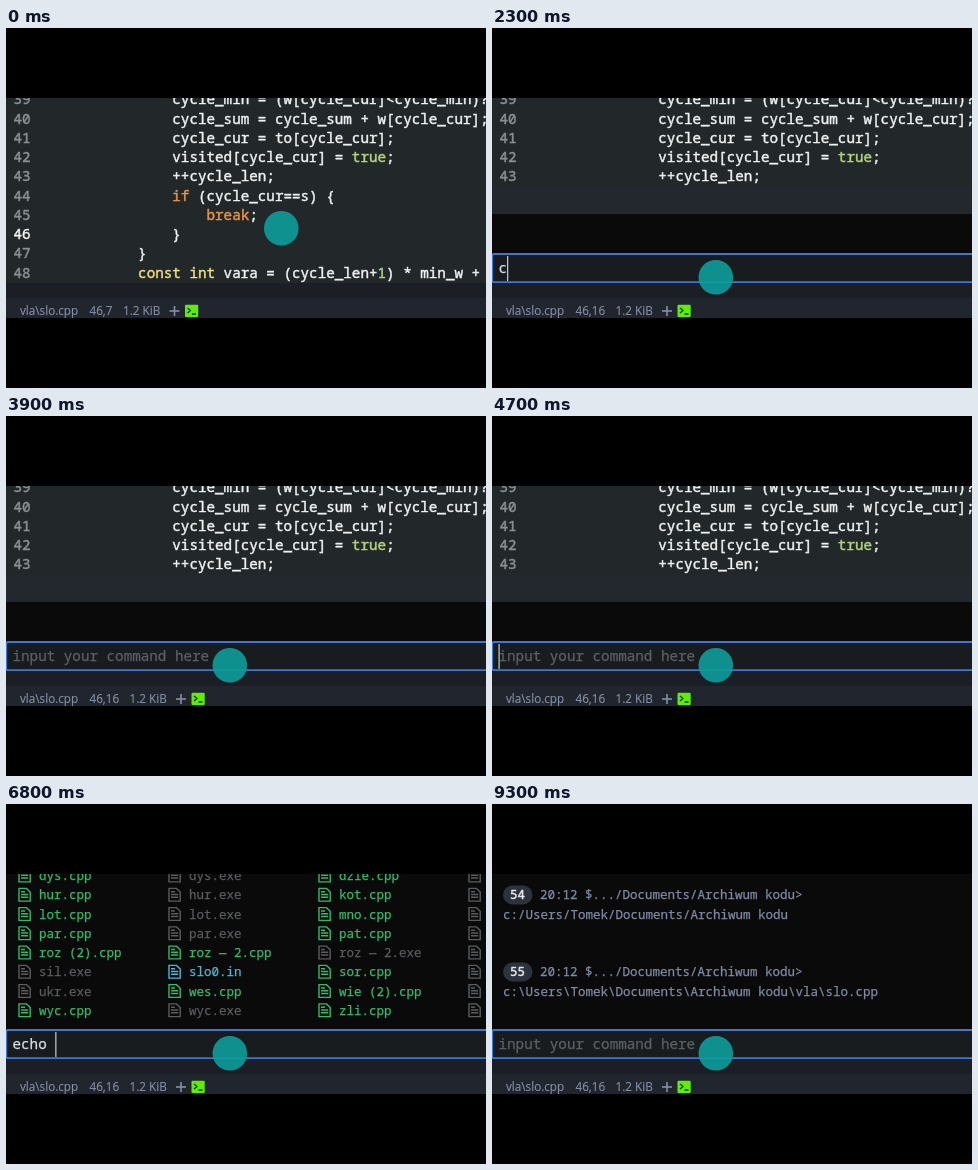
An HTML page with a canvas that plays this animation: 480 px wide and 360 px high, repeating every 9.4 s.

```html
<!DOCTYPE html>
<html>
<head>
<meta charset="utf-8">
<style>
html, body { margin: 0; width: 100%; height: 100%; overflow: hidden; background: #000; }
canvas { display: block; }
</style>
</head>
<body>
<canvas id="stage" width="480" height="360"></canvas>
<script>
const ctx = document.getElementById('stage').getContext('2d');
const LOOP = 9400, ROW = 19.25, CHAR = 8.55;
const MONO = '"Noto Sans Mono", "DejaVu Sans Mono", monospace';
const CODE_FONT = `14.25px ${MONO}`, OUT_FONT = `12.5px ${MONO}`;
const BAR_FONT = '11.7px "Open Sans", "Noto Sans", sans-serif';
const GREEN = '#2dbd6b', GRAY = '#5a5c5e', CYAN = '#4ab8d6';

// Each entry: indent in characters, code
const code = [
  [16, 'cycle_min = (w[cycle_cur]<cycle_min)?'],
  [16, 'cycle_sum = cycle_sum + w[cycle_cur];'],
  [16, 'cycle_cur = to[cycle_cur];'],
  [16, 'visited[cycle_cur] = true;'],
  [16, '++cycle_len;'],
  [16, 'if (cycle_cur==s) {'],
  [20, 'break;'],
  [16, '}'],
  [12, '}'],
  [12, 'const int vara = (cycle_len+1) * min_w +']
];
const tokenColor = {
  const: '#f0e07c', int: '#f0e07c', true: '#b5d47e', 1: '#b5d47e', if: '#e8934a', break: '#e8934a'
};

const files = [
  ['dys.cpp', 'dys.exe', 'dzie.cpp', 'dzie.exe'],
  ['hur.cpp', 'hur.exe', 'kot.cpp', 'kot.exe'],
  ['lot.cpp', 'lot.exe', 'mno.cpp', 'mno.exe'],
  ['par.cpp', 'par.exe', 'pat.cpp', 'pat.exe'],
  ['roz (2).cpp', 'roz — 2.cpp', 'roz — 2.exe', 'roz.exe'],
  ['sil.exe', 'slo0.in', 'sor.cpp', 'sor.exe'],
  ['ukr.exe', 'wes.cpp', 'wie (2).cpp', 'wie.exe'],
  ['wyc.cpp', 'wyc.exe', 'zli.cpp', 'zli.exe']
];

// Typed commands: text, start, time per key, end
const typing = [
  ['cls', 2300, 200, 3000],
  ['ls', 5000, 200, 5500],
  ['echo %(cwd)', 6200, 130, 7600],
  ['echo %(file)', 8150, 65, 8950]
];
// Commands that run: number, start, end, output
const runs = [
  [53, 3000, 3500, ''],
  [54, 7600, 7800, 'c:/Users/Tomek/Documents/Archiwum kodu'],
  [55, 8950, 9100, 'c:\\Users\\Tomek\\Documents\\Archiwum kodu\\vla\\slo.cpp']
];

function rect(x, y, w, h, color) {
  ctx.fillStyle = color;
  ctx.fillRect(x, y, w, h);
}

// A thin outline thickens the strokes slightly
function text(str, x, y, color, font, weight = 0.25) {
  ctx.font = font;
  ctx.fillStyle = ctx.strokeStyle = color;
  ctx.lineWidth = weight;
  ctx.lineJoin = 'round';
  ctx.fillText(str, x, y);
  ctx.strokeText(str, x, y);
}

function drawEditor(bottom) {
  rect(0, 70, 480, bottom - 70, '#22282a');
  ctx.save();
  ctx.beginPath();
  ctx.rect(0, 70, 480, bottom - 70);
  ctx.clip();
  code.forEach(([indent, line], i) => {
    const y = 76.4 + i * ROW, number = 39 + i;
    text(number, 7.5, y, number === 46 ? '#f4f4f4' : '#8b9193', CODE_FONT, 0.45);
    let x = 29.5 + indent * CHAR;
    for (const part of line.split(/\b(const|int|true|if|break|1)\b/)) {
      text(part, x, y, tokenColor[part] || '#f0f2f2', CODE_FONT, 0.45);
      x += part.length * CHAR;
    }
  });
  ctx.restore();
}

function drawFile(name, x, y) {
  const color = name.endsWith('.cpp') ? GREEN : name.endsWith('.in') ? CYAN : GRAY;
  ctx.strokeStyle = color;
  ctx.lineWidth = 1.4;
  ctx.lineJoin = 'miter';
  ctx.stroke(new Path2D(`M${x + 1} ${y - 6.5}h7.5l3.7 3.7v9h-11.2zM${x + 3} ${y - 3.2}h4m-4 2.8h7.2m-7.2 2.8h7.2`));
  text(name, x + 21, y + 4.5, color, OUT_FONT);
}

function drawPrompt(number, y) {
  ctx.fillStyle = '#2c333c';
  ctx.beginPath();
  ctx.roundRect(11, y - 9.5, 29.5, 19, 9.5);
  ctx.fill();
  text(number, 18, y + 4.5, '#e4e7ec', OUT_FONT, 0.5);
  text('20:12 $.../Documents/Archiwum kodu>', 48, y + 4.5, '#7f8ba3', OUT_FONT);
}

function outputRows(t) {
  const rows = t >= 5500 ? [...files] : [];
  for (const [number, start, end, out] of runs) {
    if (t < start || (t >= end && !out)) continue;
    rows.push('', number);
    if (t >= end) rows.push(out, '');
  }
  return rows;
}

function drawInput(t) {
  rect(0, 226, 480, 29, '#191c1f');
  ctx.strokeStyle = '#3b76d8';
  ctx.lineWidth = 1.9;
  ctx.beginPath();
  ctx.roundRect(0.2, 226, 490, 28.3, 2);
  ctx.stroke();
  const entry = typing.find(([, start, , end]) => t >= start && t < end);
  const typed = entry ? entry[0].slice(0, Math.floor((t - entry[1]) / entry[2]) + 1) : '';
  text(typed || 'input your command here', 6.5, 244.6, typed ? '#d8dfe8' : '#5b6166', CODE_FONT);
  if (typed || Math.floor(t / 530) % 2 === 0) {
    rect(6.5 + typed.length * CHAR, 228, 1.2, 25, '#c8ccd0');
  }
}

function drawPanel(t, running) {
  const rows = outputRows(t), bottom = running ? 255 : 226;
  const top = Math.max(43, bottom - 40 - rows.length * ROW);
  drawEditor(Math.max(70, top - 27));
  rect(0, top - 27, 480, 27, '#23272e');
  rect(0, top, 480, 255 - top, '#0a0a0b');
  rows.forEach((row, i) => {
    const y = bottom - 19.6 - (rows.length - 1 - i) * ROW;
    if (Array.isArray(row)) row.forEach((name, col) => drawFile(name, 12 + col * 150, y));
    else if (typeof row === 'number') drawPrompt(row, y);
    else text(row, 11, y + 4.5, '#7f8ba3', OUT_FONT);
  });
  if (!running) drawInput(t);
}

function drawStatus(t, running) {
  const moved = t >= 300, shift = moved ? 6.5 : 0, color = '#8590a6';
  rect(0, 255, 480, 15, '#1b1f25');
  rect(0, 270, 480, 20, '#21252d');
  text('vla\\slo.cpp', 14, 286.7, color, BAR_FONT, 0.15);
  text(moved ? '46,16' : '46,7', 83.5, 286.7, color, BAR_FONT, 0.15);
  text('1.2 KiB', 117 + shift, 286.7, color, BAR_FONT, 0.15);
  rect(163.5 + shift, 282.2, 10, 1.6, color);
  rect(167.7 + shift, 278, 1.6, 10, color);
  ctx.fillStyle = running ? '#0cf0f0' : '#5cf000';
  ctx.beginPath();
  ctx.roundRect(179 + shift, 276.7, 13.2, 12.3, 1);
  ctx.fill();
  ctx.strokeStyle = '#20302a';
  ctx.lineWidth = 1.3;
  ctx.stroke(new Path2D(`M${181.5 + shift} 280l3 2.5l-3 2.5m4.5 1h4`));
}

function drawPointer(t) {
  const p = Math.min(1, Math.max(0, (t - 200) / 1000)), k = p * p * (3 - 2 * p);
  ctx.fillStyle = 'rgba(14, 155, 153, 0.92)';
  ctx.beginPath();
  ctx.arc(275.3 - 51.5 * k, 200.3 + 49 * k, 17.3, 0, Math.PI * 2);
  ctx.fill();
}

function frame() {
  const t = performance.now() % LOOP;
  const running = runs.some(([, start, end]) => t >= start && t < end);
  rect(0, 0, 480, 360, '#000');
  ctx.save();
  ctx.beginPath();
  ctx.rect(0, 70, 480, 220);
  ctx.clip();
  if (t < 1000) drawEditor(255);
  else drawPanel(t, running);
  drawStatus(t, running);
  drawPointer(t);
  ctx.restore();
  requestAnimationFrame(frame);
}
frame();
</script>
</body>
</html>
```
